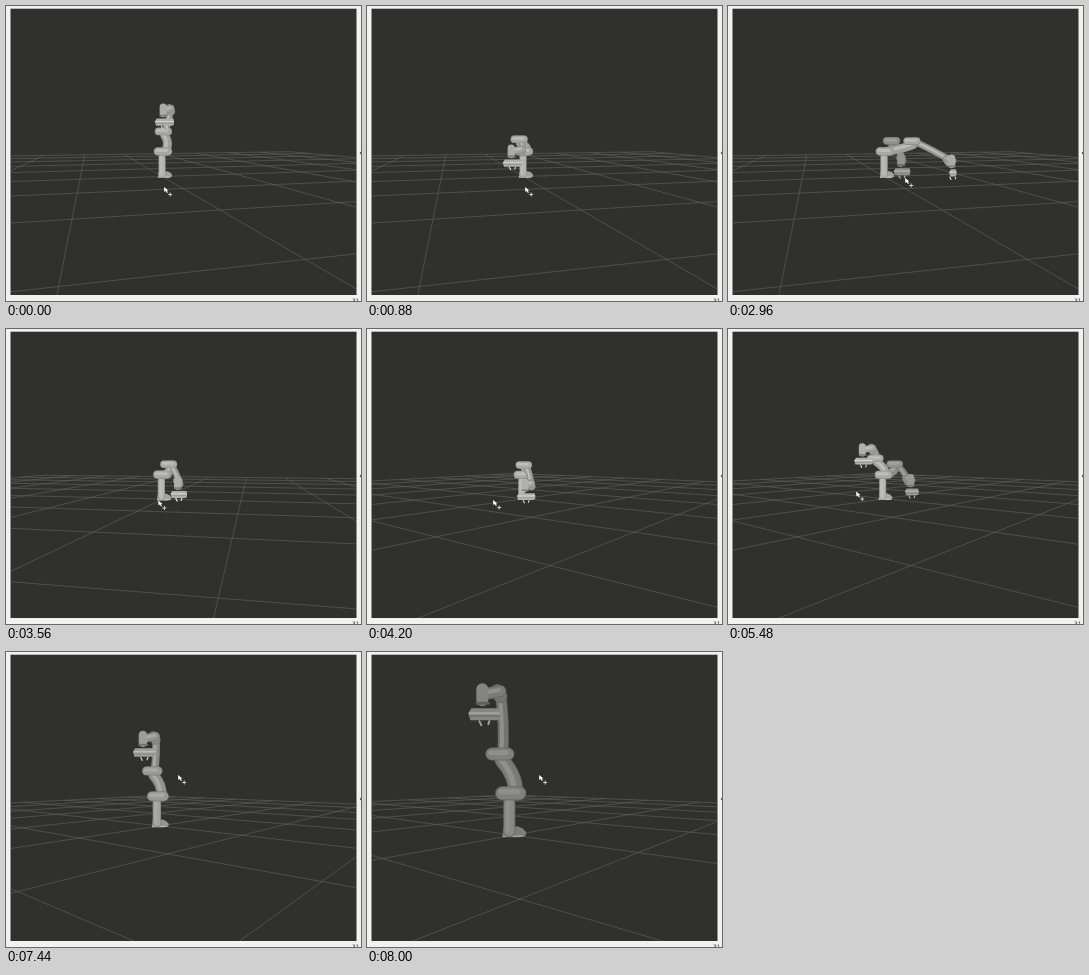
Animation of 355 by 295 pixels, one loop 8.04 s. Source, as an HTML page:

```html
<!DOCTYPE html>
<html lang="en">
<head>
<meta charset="utf-8">
<title>Robot arm view</title>
<style>
html, body { margin: 0; width: 100%; height: 100%; overflow: hidden; background: #f1f2ed; }
svg { display: block; width: 355px; height: 295px; }
text { font: 6px "DejaVu Sans", sans-serif; fill: #333; }
</style>
</head>
<body>
<svg viewBox="0 0 355 295">
  <defs><clipPath id="view"><rect x="5" y="3" width="345" height="286"/></clipPath></defs>
  <rect width="355" height="295" fill="#f1f2ed"/>
  <rect x="4.5" y="2.7" width="346" height="286.3" fill="#30302e"/>
  <g clip-path="url(#view)">
    <path id="grid" fill="none" stroke="#5f5f5d" stroke-width=".65"/>
    <g id="robots" stroke-linecap="round" stroke-linejoin="round">
      <g id="ghost" opacity=".8"></g>
      <g id="arm"></g>
    </g>
    <g id="cursor">
      <path d="M0 0L.4 5L1.7 4L2.9 6L3.8 5.5L2.9 3.6L4.4 3.4Z" fill="#fff"/>
      <path d="M4.2 7.5H8.2M6.2 5.5V9.5" stroke="#deded9" stroke-width=".9"/>
    </g>
  </g>
  <path d="M355 145.5L353.6 147L355 148.5Z" fill="#444"/>
  <text x="346" y="296.5">31 fps</text>
</svg>
<script>
const LOOP = 8040, STEP = 40, FOCAL = 345, CX = 177.5, CY = 146, PITCH = .0521;
const REF = 2.6;                                   // distance at which robot units are pixels
const FIRST = 120, PERIOD = 855, MOVE = 800, VIA = .3;
const $ = id => document.getElementById(id);
const clamp = (v, lo, hi) => Math.min(hi, Math.max(lo, v));
const part = (t, a, b) => clamp((t - a) / (b - a), 0, 1);
const smooth = p => p * p * (3 - 2 * p);
const mix = (a, b, p) => a.map((v, i) => v + (b[i] - v) * p);

// Head positions: each move passes its first point and stops at the second
const home = [-2, -113], high = [-31, -143];
const moves = [
  [[-10, -80], [-24, -44]],
  [[-30, -40], [-38, -30]],
  [[70, -33], [24, -30]],
  [[110, -28], [24, -30]],
  [[12, -30], [0, -25]],
  [[25, -30], [45, -34]],
  [[-40, -88], [30, -58]],
  [[-22, -125], high],
  [[-19, -115], high]
];

function motion(t) {
  const i = clamp(Math.floor((t - FIRST) / PERIOD), 0, moves.length - 1);
  const p = part(t - FIRST - i * PERIOD, 0, MOVE);
  const from = i ? moves[i - 1][1] : home, [via, to] = moves[i];
  const head = p < VIA ? mix(from, via, smooth(p / VIA)) : mix(via, to, smooth((p - VIA) / (1 - VIA)));
  const ghost = p > 0 && p < .7 && i < moves.length - 1 ? from : null;
  return { head, ghost };
}

function camera(t) {
  const turn = part(t, 3000, 4150), zoom = part(t, 7000, 8000);
  const degrees = -15.3 + 54.2 * turn, yaw = degrees * Math.PI / 180;
  const dist = 4.35 + .19 * turn - 1.94 * zoom;
  return {
    degrees, dist, sin: Math.sin(yaw), cos: Math.cos(yaw),
    height: .24 + .0685 * dist, side: -.19 - .018 * dist
  };
}

// Ground point in camera space: right, down, depth
function ground(cam, a, b) {
  const z = cam.dist + a * cam.cos - b * cam.sin, s = Math.sin(PITCH), c = Math.cos(PITCH);
  return [cam.side + a * cam.sin + b * cam.cos, cam.height * c - z * s, z * c + cam.height * s];
}

const project = ([x, y, z]) => [CX + FOCAL * x / z, CY + FOCAL * y / z];

function segment(p, q) {
  const near = .15;
  if (p[2] < near && q[2] < near) return "";
  const clip = (u, v) => u[2] >= near ? u : mix(u, v, (near - u[2]) / (v[2] - u[2]));
  const show = u => project(u).map(n => n.toFixed(2)).join(" ");
  return "M" + show(clip(p, q)) + "L" + show(clip(q, p));
}

function gridPath(cam) {
  let d = "";
  for (let i = -5; i <= 5; i++) {
    d += segment(ground(cam, -5, i), ground(cam, 5, i));
    d += segment(ground(cam, i, -5), ground(cam, i, 5));
  }
  return d;
}

const line = (d, color, width) => `<path d="${d}" fill="none" stroke="${color}" stroke-width="${width}"/>`;
const shape = (d, color) => `<path d="${d}" fill="${color}"/>`;

// Rounded link with a dark rim and a lit side; bend pushes its middle sideways
function link(x0, y0, x1, y1, w, tone = "#80807f", bend = 0) {
  const d = `M${x0} ${y0}Q${(x0 + x1) / 2 + bend} ${(y0 + y1) / 2} ${x1} ${y1}`;
  const lit = `<g transform="translate(${-w * .12} ${-w * .1})">${line(d, "#8f8f8e", w * .35)}</g>`;
  return line(d, "#6a6a69", w) + line(d, tone, w - 2) + lit;
}

function hand(x, y, half) {
  const l = x - half, r = x + half;
  return shape(`M${l} ${y + 1}L${l + 3} ${y - 4}H${r - 1}L${r} ${y}V${y + 6}L${r - 3} ${y + 8}H${l + 2}Z`, "#858584") +
    line(`M${l + 1} ${y + 1}H${r - 1}`, "#aeaeac", 1.3) +
    line(`M${l + 2} ${y + 4}H${r - 1}`, "#6a6a69", 1) +
    line(`M${x - 5} ${y + 9}L${x - 3} ${y + 13}M${x + 5} ${y + 9}L${x + 4} ${y + 12}`, "#a0a09e", 2);
}

// The other joints follow from the head position
function robot([hx, hy]) {
  const ex = .4 * hx, ey = .19 * hy - 54;
  const wx = hx + clamp(12 - .4 * hx, -5, 18), wy = hy - 1;
  return shape("M-11 2L-10 -8L4 -9L9 -7L13 -3L12 1L6 2Z", "#7d7d7c") +
    line("M-10 1H9", "#a6a6a4", 1.2) +
    link(-4, -4, -4, -32, 12, "#898988") +
    link(2, -42, ex + 1, ey + 6, 15, "#7b7b7a", 8) +
    link(-11, -42, 6, -42, 14) +
    link(ex + 2, ey, wx, wy, 11, "#747473", 3) +
    link(ex - 9, ey, ex + 7, ey, 13) +
    link(wx - 3, wy, wx, wy + 5, 14, "#747473") +
    link(wx, wy, hx + 2, hy + 2, 12, "#7b7b7a") +
    line(`M${hx} ${hy - 3}V${hy + 8}`, "#848483", 12) +
    line(`M${hx - 5} ${hy + 11}H${hx + 6}`, "#5f5f5e", 3) +
    hand(hx + 2, hy + 20, 16 - .09 * Math.max(0, hx));
}

function draw(t) {
  const cam = camera(t), base = ground(cam, 0, 0), [x, y] = project(base);
  const { head, ghost } = motion(t);
  const scale = REF / cam.dist, shift = (39 - cam.degrees) * .065 * scale;
  $("grid").setAttribute("d", gridPath(cam));
  $("robots").setAttribute("transform", `translate(${x + shift} ${y}) scale(${scale})`);
  $("robots").style.filter = `brightness(${1 + .17 * (cam.dist - REF)})`;
  $("ghost").innerHTML = ghost ? robot(ghost) : "";
  $("arm").innerHTML = robot(head);

  const lead = part(t, 2720, 2920), drag = part(t, 3000, 4150);
  const back = part(t, 5300, 6000), rise = part(t, 6360, 6880);
  const mx = 158 + 19 * lead - 51 * drag + 8 * back + 38 * rise;
  const my = 181 - 9 * lead - drag - 33 * back - 15 * rise;
  $("cursor").setAttribute("transform", `translate(${mx} ${my})`);
}

let last = -1;
const start = performance.now();
function tick() {
  const t = Math.floor((performance.now() - start) % LOOP / STEP) * STEP;
  if (t !== last) draw(last = t);
  requestAnimationFrame(tick);
}
tick();
</script>
</body>
</html>
```
